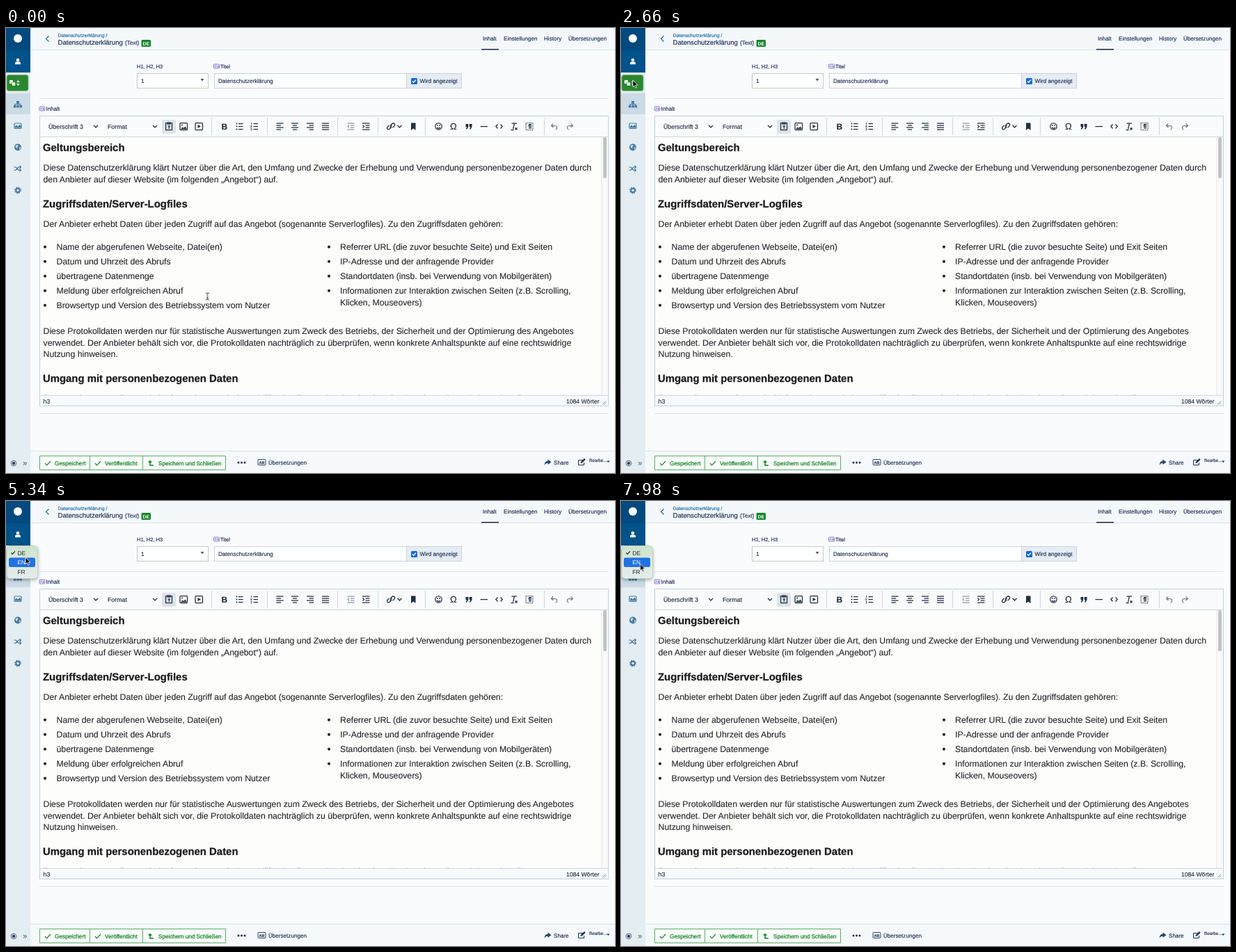
These frames come from a looping animation (875 px wide and 640 px high, 8000 ms). An HTML page:

```html
<!DOCTYPE html>
<html lang="de">
<head>
<meta charset="utf-8">
<title>Editor</title>
<style>
html, body { margin: 0; width: 100%; height: 100%; overflow: hidden; background: #f9fbfd; }
svg { display: block; }
text { font-family: "Liberation Sans", Arial, sans-serif; text-rendering: geometricPrecision; white-space: pre; }
.ui text { fill: #1d2d55; font-size: 8.1px; stroke: #1d2d55; stroke-width: .15px; }
.ui .small { font-size: 7.5px; }
.ui .tool { font-size: 8.8px; fill: #222f3e; stroke: #222f3e; }
.body text { font-size: 12.3px; fill: #25272b; stroke: #25272b; stroke-width: .12px; }
.body .head { font-size: 14.9px; font-weight: 700; fill: #1a1b1d; stroke: #1a1b1d; stroke-width: .25px; }
.ui .save text { fill: #17852a; stroke: #17852a; stroke-width: .28px; }
.line { fill: none; stroke: #222f3e; stroke-width: 1.25; }
.fill { fill: #222f3e; }
.rule { fill: none; stroke: #dce2ee; }
.side { fill: #487a9f; }
.sideLine { fill: none; stroke: #487a9f; stroke-width: 1.2; }
#menu text { font-size: 8.4px; fill: #20262a; stroke: none; }
</style>
</head>
<body>
<svg width="875" height="640" viewBox="0 0 875 640">
  <defs>
    <linearGradient id="menuFill" x1="0" y1="0" x2="0" y2="1">
      <stop offset="0" stop-color="#cde4cc"/><stop offset=".5" stop-color="#dbe9dc"/><stop offset="1" stop-color="#e4ecec"/>
    </linearGradient>
    <filter id="shadow" x="-30%" y="-30%" width="160%" height="160%">
      <feDropShadow dx="0" dy="2" stdDeviation="2.5" flood-opacity=".3"/>
    </filter>
    <clipPath id="page"><rect x="48" y="157" width="808" height="371"/></clipPath>
    <path id="chevron" d="M-3-1.5 0 1.5 3-1.5"/>
    <path id="check" d="M-4 0-1.5 2.8 4-3"/>
    <g id="ab"><rect x=".5" y=".5" width="8" height="6" rx="1" fill="#f0ecfc" stroke="#7867c2" stroke-width=".8"/><path d="M2 5 3.2 2 4.3 5M6 2v3h1.2v-2H6" fill="none" stroke="#7867c2" stroke-width=".7"/></g>
  </defs>

  <rect width="875" height="640" fill="#f9fbfd"/>
  <rect x="35" width="840" height="31" fill="#f4f8fb"/>
  <rect x="35" y="608" width="840" height="32" fill="#f5f9fb"/>
  <path class="rule" d="M35 31.5H875M48 101.5H866M48 554.5H866M35 608.5H875"/>

  <!-- sidebar -->
  <rect width="35" height="640" fill="#e3edf2"/>
  <rect width="35" height="64" fill="#004a7f"/>
  <rect y="32" width="35" height="32" fill="#00528a"/>
  <rect y="94" width="35" height="30" fill="#cbdae4"/>
  <circle cx="17" cy="15" r="6" fill="#fff"/>
  <g fill="#fff"><circle cx="17" cy="46" r="2.3"/><path d="M13 52.2v-1.4q0-2.3 2.4-2.3h3.2q2.4 0 2.4 2.3v1.4z"/></g>
  <rect x="1" y="67.5" width="31" height="23" rx="3" fill="#2a872f" stroke="#83b98b" stroke-width=".8"/>
  <g fill="#fff"><rect x="5" y="75" width="5" height="5" rx=".6"/><rect x="8.5" y="78" width="5" height="5" rx=".6" stroke="#2a872f" stroke-width=".6"/><path d="M15 78 17.5 75 20 78zM15 80h5l-2.5 3z"/></g>
  <g class="side"><rect x="15" y="105" width="4" height="3.5"/><rect x="11" y="111" width="3.5" height="3.5"/><rect x="15.3" y="111" width="3.5" height="3.5"/><rect x="19.5" y="111" width="3.5" height="3.5"/></g>
  <path class="sideLine" d="M17 108v3M13 111v-1.5h8v1.5"/>
  <rect class="sideLine" x="12" y="137" width="10" height="7.5" rx="1"/>
  <path class="side" d="M13 143.5v-2l2-2 2 2 2.5-2.5 2 2v2.5z"/>
  <circle class="side" cx="17" cy="171.5" r="5"/><path d="M13.5 169.5 16 168l2 1.500-2 2v2l-2-2zM19 172l2-1v2l-2 2z" fill="#c5dbe8"/>
  <path class="sideLine" d="M11.5 200h2.5l4 4.5h3M11.5 204.5h2.5l4-4.5h3M19.5 198l2 2-2 2M19.5 202.5l2 2-2 2"/>
  <circle class="sideLine" cx="17" cy="233.5" r="2.7" style="stroke-width:2"/>
  <circle class="sideLine" cx="17" cy="233.5" r="4.3" stroke-dasharray="1.9 1.477"/>
  <circle cx="11" cy="626" r="3.8" fill="none" stroke="#31465f" stroke-width=".8"/><circle cx="11" cy="626" r="2.2" fill="#31465f"/>
  <path d="M25 624l2 2.3-2 2.3M27.5 624l2 2.3-2 2.3" fill="none" stroke="#31465f"/>

  <g class="ui">
    <!-- header -->
    <path d="M61.5 11.5 57.5 15.5 61.5 19.5" fill="none" stroke="#1465a5" stroke-width="1.1"/>
    <text x="74.5" y="12.5" style="font-size:6.9px;fill:#1465a5;stroke:#1465a5">Datenschutzerklärung /</text>
    <text x="74.5" y="24" style="font-size:9.6px">Datenschutzerklärung</text>
    <text x="171" y="24">(Text)</text>
    <rect x="194.5" y="17" width="13.5" height="10" rx="1.5" fill="#17852a"/>
    <text x="196.6" y="24.6" style="font-size:6.8px;font-weight:700;fill:#fff;stroke:none">DE</text>
    <text x="685" y="18">Inhalt</text><text x="715" y="18">Einstellungen</text>
    <text x="773" y="18">History</text><text x="808" y="18">Übersetzungen</text>
    <rect x="683" y="30" width="25" height="1.5" fill="#1f2b48"/>

    <!-- form -->
    <text class="small" x="188" y="57.5">H1, H2, H3</text>
    <use href="#ab" x="298" y="51.5"/><text class="small" x="308" y="57.5">Titel</text>
    <rect x="188.5" y="65.5" width="102" height="21" fill="#fdfefe" stroke="#c6cbbc"/>
    <text x="194" y="79">1</text><path d="M279.5 73h5l-2.5 3.5z" fill="#505763"/>
    <rect x="299.5" y="65.5" width="276" height="21" fill="#fdfefe" stroke="#cbd2e0"/>
    <rect x="575.5" y="65.5" width="79" height="21" fill="#e5ecf3" stroke="#cbd2e0"/>
    <text x="305" y="79">Datenschutzerklärung</text>
    <rect x="582" y="72" width="9" height="9" rx="1.5" fill="#1469d4"/>
    <use href="#check" transform="translate(586.5 76.5) scale(.65)" fill="none" stroke="#fff" stroke-width="2"/>
    <text x="594.5" y="79">Wird angezeigt</text>
    <use href="#ab" x="47.5" y="112.5"/><text x="57.5" y="119">Inhalt</text>

    <!-- editor frame -->
    <rect x="48.5" y="126.5" width="817" height="417" fill="#fdfdfb" stroke="#c6cde0"/>
    <rect x="49" y="127" width="816" height="29" fill="#f9fbfd"/>
    <rect x="49" y="529" width="816" height="14" fill="#f7fafd"/>
    <path d="M48 156.5H866M48 528.5H866" stroke="#cfd5e4"/>
    <rect x="856" y="157" width="9" height="371" fill="#f8f9f8"/><path d="M855.5 157v371" stroke="#e8eae8"/>
    <rect x="858" y="157" width="5" height="59" rx="2.5" fill="#c0c2c3"/>
    <text class="tool" x="53.5" y="540">h3</text>
    <text class="tool" x="805" y="540" style="font-size:8.6px">1084 Wörter</text>
    <path d="M857 541.5l5-5M860 541.5l2-2" stroke="#59616d" stroke-width=".8"/>

    <!-- toolbar -->
    <text class="tool" x="61" y="145">Überschrift 3</text><text class="tool" x="146" y="145">Format</text>
    <g class="line"><use href="#chevron" x="129" y="141.5"/><use href="#chevron" x="214" y="141.5"/><use href="#chevron" x="565.5" y="141.5"/></g>
    <path d="M295.5 129v25M375.5 129v25M476.5 129v25M534.5 129v25M602.5 129v25M773.5 129v25" stroke="#d0d6e6"/>
    <rect x="224" y="132" width="20" height="20" rx="2" fill="#dee3ea"/>
    <g class="line">
      <path d="M229.5 136.5h9v10h-9zM232 136v2h4v-2zM232.5 141h3.5M234.3 141v4"/>
      <rect x="250" y="136.5" width="10.5" height="10" rx="1"/>
      <rect x="272" y="136.5" width="10.5" height="10" rx="1"/>
      <path d="M334 137.5h6.5M334 141.5h6.5M334 145.5h6.5M355.5 137.5h6.5M355.5 141.5h6.5M355.5 145.5h6.5"/>
      <path d="M352.5 136v3M351.5 140.5h1.5l-1.5 2h1.500M351.5 144.500h1.500v2.500h-1.500" stroke-width=".8"/>
      <path d="M388.5 137h10M388.5 140h6.5M388.5 143h10M388.5 146h6.5M410 137h10M412 140h6M410 143h10M412 146h6M432 137h10M435.5 140h6.5M432 143h10M435.5 146h6.5M454 137h10M454 140h10M454 143h10M454 146h10"/>
      <path d="M490.5 137h10M495 140h5.5M495 143h5.5M490.5 146h10M493 139.5 491 141.5 493 143.5" stroke="#9097a2"/>
      <path d="M512 137h10.5M516.5 140h6M516.5 143h6M512 146h10.5M512.5 139.5 514.5 141.5 512.5 143.5"/>
      <path d="M552 140.5l2.5-2.5q2-1.8 3.5-.3t-.3 3.5l-2.2 2M554 142.5l-2.5 2.5q-2 1.8-3.3.3t.3-3.3l2-2M551.5 143l3-3"/>
      <circle cx="621.5" cy="141.5" r="4.7"/><path d="M619 143q2.5 2.7 5 0"/>
      <path d="M681.5 141.5h10.5M706.5 138.5 703.8 141.5l2.7 3M710.5 138.5l2.7 3-2.7 3"/>
      <path d="M726.5 137h7.5M730.5 137l-2 8.5M725.5 146.5h4M731.5 143.5l3 3M734.5 143.5l-3 3"/>
      <rect x="747" y="136.5" width="10" height="10" stroke-dasharray="1.2 1.3"/>
      <path d="M752 138.5v6.5M754 138.5v6.5M755 138.5h-3.5"/>
      <path d="M786 137.5 783.5 140.5 786.5 143M784 140.5h4.5q3.5.3 3 3.5-.3 1.8-2 2.3M811.5 137.5l3 3-3 2.5M814 140.5h-4.5q-3.5.3-3 3.5.3 1.8 2 2.3" stroke="#747d89"/>
    </g>
    <g class="fill">
      <path d="M251 145.5l2.5-3 2 1.5 2-2.5 2.5 4z"/><circle cx="253" cy="139.5" r="1"/>
      <path d="M275.5 139v5l4.5-2.5zM582 136.5h6.5v10.5l-3.25-2.5-3.25 2.5z"/>
      <circle cx="331.5" cy="137.5" r="1"/><circle cx="331.5" cy="141.5" r="1"/><circle cx="331.5" cy="145.5" r="1"/>
      <circle cx="619.8" cy="140" r=".9"/><circle cx="623.2" cy="140" r=".9"/>
      <path d="M660.5 138h3.8v4l-1.8 3.5h-1.8l1.3-3.5h-1.5zM665.7 138h3.8v4l-1.8 3.5h-1.8l1.3-3.5h-1.5zM752 138.5q-3 1.5 0 3.5z"/>
    </g>
    <text class="tool" x="309.5" y="145.8" style="font-size:12px;font-weight:700">B</text>
    <text class="tool" x="638" y="146" style="font-size:13px">Ω</text>

    <!-- footer -->
    <g class="save">
      <path d="M48.5 615.5H315.5V635.5H48.5zM120.5 615v20M196.5 615v20" fill="#fbfefc" stroke="#5cac68"/>
      <g fill="none" stroke="#17852a" stroke-width="1.2"><use href="#check" x="60" y="626"/><use href="#check" x="132" y="626"/></g>
      <path d="M204 625l3-3.5 3 3.5z" fill="#17852a"/><path d="M207 624v5h5" fill="none" stroke="#17852a" stroke-width="1.6"/>
      <text x="70" y="629" style="font-size:8.25px">Gespeichert</text><text x="142" y="629">Veröffentlicht</text>
      <text x="219" y="629">Speichern und Schließen</text>
    </g>
    <g fill="#1d2d55"><circle cx="334" cy="625" r="1.5"/><circle cx="338.5" cy="625" r="1.5"/><circle cx="343" cy="625" r="1.5"/></g>
    <rect x="362" y="620.5" width="11" height="8" rx="1" fill="none" stroke="#1d2d55" stroke-width=".9"/>
    <text x="363.5" y="626.6" style="font-size:5.5px;font-weight:700">AB</text>
    <text x="377" y="628">Übersetzungen</text>
    <path d="M778.5 620.5l5 3.7-5 3.7v-2.2q-3.5 0-4.8 3.3-.3-6 4.8-6.3z" fill="#27436d"/>
    <text x="787" y="628">Share</text>
    <path d="M829 621.5h-6.5v7h8v-3.5" fill="none" stroke="#1d2d55"/><path d="M825.5 626l.5-2.2 5-4.8 1.7 1.7-5 4.8z" fill="#1d2d55"/>
    <text x="838" y="624" style="font-size:6.3px">Bearbe...</text><path d="M863 622.5h4.5l-2.25 2.5z" fill="#1d2d55"/>
  </g>

  <g class="body" clip-path="url(#page)">
    <text class="head" x="53" y="177">Geltungsbereich</text>
    <text x="53.5" y="205">Diese Datenschutzerklärung klärt Nutzer über die Art, den Umfang und Zwecke der Erhebung und Verwendung personenbezogener Daten durch</text>
    <text x="53.5" y="221.5">den Anbieter auf dieser Website (im folgenden „Angebot“) auf.</text>
    <text class="head" x="53" y="258">Zugriffsdaten/Server-Logfiles</text>
    <text x="53.5" y="285.5">Der Anbieter erhebt Daten über jeden Zugriff auf das Angebot (sogenannte Serverlogfiles). Zu den Zugriffsdaten gehören:</text>
    <g id="lists"></g>
    <text x="480" y="398.5">Klicken, Mouseovers)</text>
    <text x="53.5" y="440">Diese Protokolldaten werden nur für statistische Auswertungen zum Zweck des Betriebs, der Sicherheit und der Optimierung des Angebotes</text>
    <text x="53.5" y="456.5">verwendet. Der Anbieter behält sich vor, die Protokolldaten nachträglich zu überprüfen, wenn konkrete Anhaltspunkte auf eine rechtswidrige</text>
    <text x="53.5" y="473">Nutzung hinweisen.</text>
    <text class="head" x="53" y="509">Umgang mit personenbezogenen Daten</text>
    <text x="53.5" y="535.8" style="fill:#a0a8c4;stroke:none">Personenbezogene Daten sind Informationen, mit deren Hilfe eine Person bestimmbar ist, also Angaben, die zurück zu einer Person</text>
  </g>

  <g id="menu">
    <rect x="1" y="64.5" width="44.5" height="47" rx="5" fill="url(#menuFill)" stroke="#b4c4b8" stroke-width=".6" filter="url(#shadow)"/>
    <rect id="highlight" x="4" y="81.5" width="38" height="13.5" rx="2.5" fill="#2272e4"/>
    <use href="#check" transform="translate(10.3 74.5) scale(.7)" fill="none" stroke="#20262a" stroke-width="1.7"/>
    <text x="16.5" y="77.7">DE</text><text x="16.5" y="91.3" style="fill:#fff">EN</text><text x="16.5" y="105">FR</text>
  </g>

  <g id="cursor">
    <path id="beam" d="M-2.5-5Q0-5 0-3.5V3.5Q0 5-2.5 5M2.5-5Q0-5 0-3.5M0 3.5Q0 5 2.5 5M-1.2 2h2.4" fill="none" stroke="#222" stroke-width=".9"/>
    <path id="arrow" d="M0 0V9.7L2.2 7.7 3.7 11.2 5.3 10.5 3.8 7.1H6.9Z" fill="#000" stroke="#fff" stroke-width=".8"/>
  </g>
</svg>
<script>
const LOOP = 8000, SWITCH = 1430, OPEN = 3360, HOVER = 3540;
const $ = id => document.getElementById(id);

const lists = [
  [53, 72.5, ["Name der abgerufenen Webseite, Datei(en)", "Datum und Uhrzeit des Abrufs", "übertragene Datenmenge",
    "Meldung über erfolgreichen Abruf", "Browsertyp und Version des Betriebssystem vom Nutzer"]],
  [461, 480, ["Referrer URL (die zuvor besuchte Seite) und Exit Seiten", "IP-Adresse und der anfragende Provider",
    "Standortdaten (insb. bei Verwendung von Mobilgeräten)", "Informationen zur Interaktion zwischen Seiten (z.B. Scrolling,"]]
];
$("lists").innerHTML = lists.map(([dotX, textX, items]) => items.map((item, i) => {
  const y = 318.5 + 21 * i;
  return `<circle cx="${dotX + 3}" cy="${y - 3.7}" r="2.1" fill="#25272b"/><text x="${textX}" y="${y}">${item}</text>`;
}).join("")).join("");

const play = (id, steps) => $(id).animate(steps, { duration: LOOP, iterations: Infinity });

// Shows an element only between two times
const show = (id, from, to) => play(id, [[0, from === 0], [from, true], [to, to === LOOP]]
  .filter(([t], i) => i === 0 || t > 0)
  .map(([t, on]) => ({ offset: t / LOOP, opacity: on ? 1 : 0, easing: "steps(1, end)" })));

// time, x, y of the pointer tip
const path = [
  [0, 289.5, 386], [950, 289.5, 386], [1700, 88, 83], [2250, 20, 77], [2600, 17, 75], [3360, 17, 75],
  [3640, 22, 80.5], [4200, 22, 80.5], [5300, 28, 81], [5900, 28, 81], [6700, 28.5, 90.5], [7500, 28.5, 90.5], [LOOP, 27.5, 90.5]
];
play("cursor", path.map(([t, x, y]) => ({ offset: t / LOOP, transform: `translate(${x}px, ${y}px)`, easing: "ease-in-out" })));
show("beam", 0, SWITCH);
show("arrow", SWITCH, LOOP);
show("menu", OPEN, LOOP);
play("highlight", [[0, -13.5], [HOVER, 0], [LOOP, 0]]
  .map(([t, y]) => ({ offset: t / LOOP, transform: `translateY(${y}px)`, easing: "steps(1, end)" })));
</script>
</body>
</html>
```
